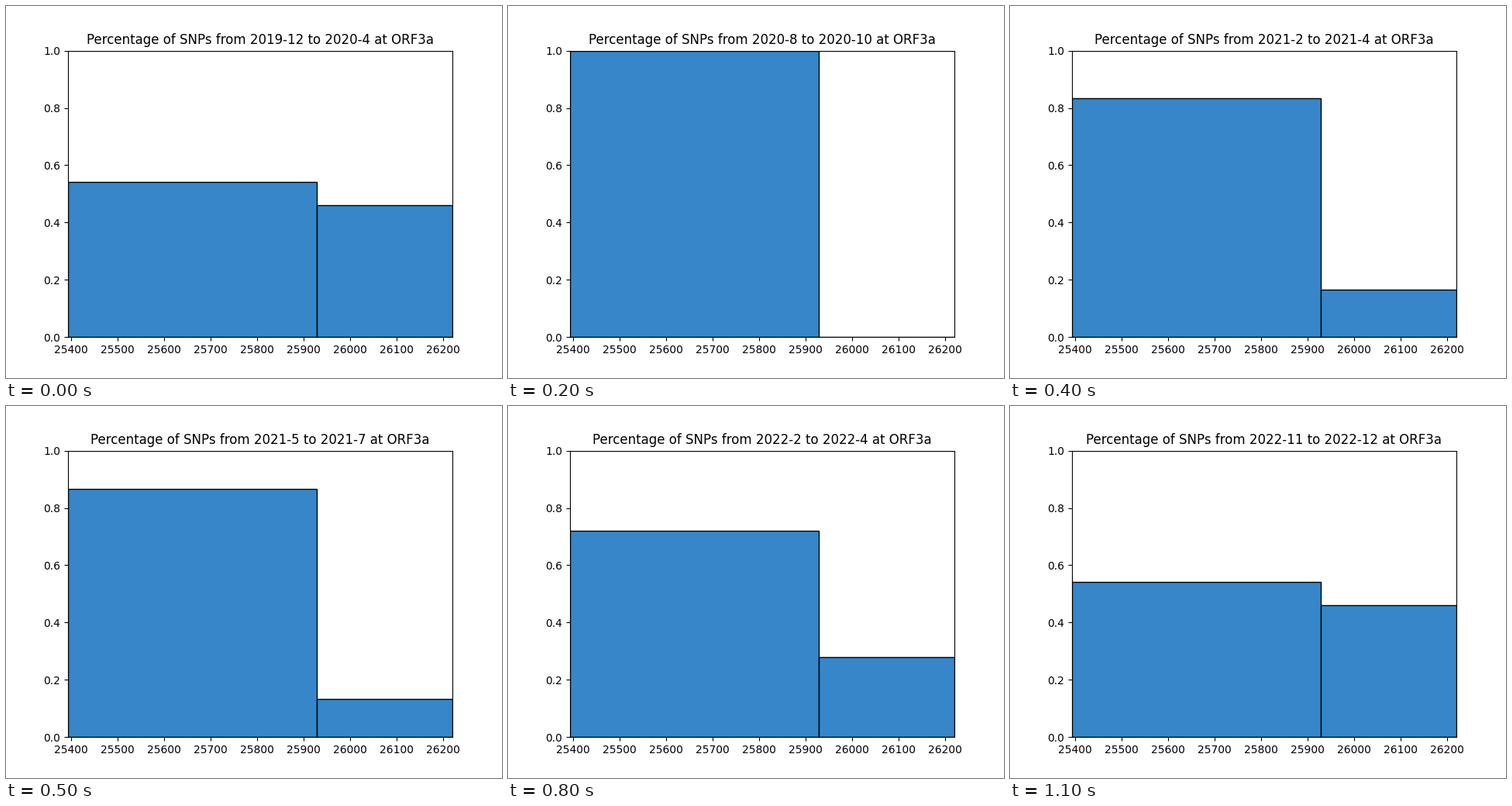
These frames come from a looping animation (640 by 480 pixels, 1200 ms). A matplotlib script:

```python
import matplotlib.pyplot as plt
from matplotlib.animation import FuncAnimation

START, SPLIT, END = 25393, 25929, 26220
FIRST, LAST = 2019 * 12 + 11, 2022 * 12 + 11  # months counted from year 0

# Share of SNPs in the left bin for each period
shares = [20 / 37, 0.77, 1.0, 65 / 81, 0.835, 13 / 15,
          0.895, 0.92, 0.72, 9 / 17, 0.535, 20 / 37]


def month(n):
    return f"{n // 12}-{n % 12 + 1}"


def period(i):
    """Quarters from 2020-5 on, after a longer opening period."""
    begin = FIRST + 5 + 3 * (i - 1) if i else FIRST
    end = min(FIRST + 4 + 3 * i, LAST)
    return f"{month(begin)} to {month(end)}"


plt.rcParams["font.family"] = "DejaVu Sans"
fig, ax = plt.subplots(figsize=(6.4, 4.8), dpi=100)
ax.set_position([0.125, 0.11, 0.775, 0.77])
bars = ax.bar([START, SPLIT], [0, 0], width=[SPLIT - START, END - SPLIT],
              align="edge", color="#3686c9", edgecolor="black", linewidth=1)
ax.set_xlim(START, END)
ax.set_ylim(0, 1)
title = ax.set_title("", fontsize=12)


def draw(i):
    bars[0].set_height(shares[i])
    bars[1].set_height(1 - shares[i])
    title.set_text(f"Percentage of SNPs from {period(i)} at ORF3a")
    return [*bars, title]


anim = FuncAnimation(fig, draw, frames=len(shares), interval=100,
                     repeat=True, repeat_delay=0)
plt.show()
```
